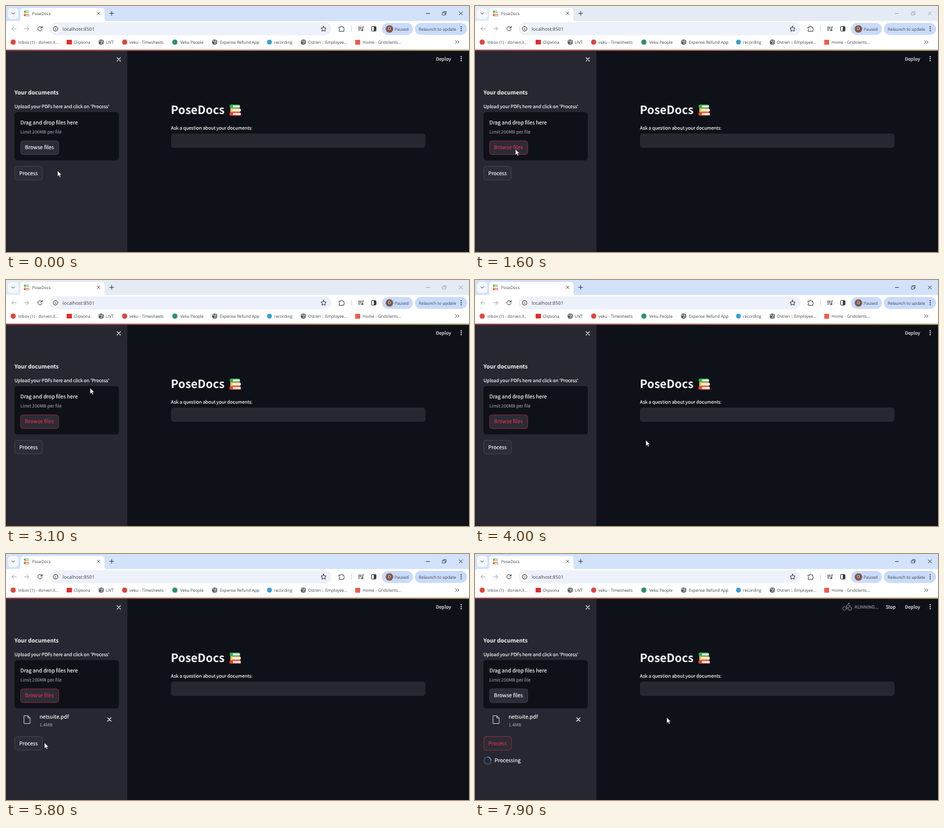
Animation of 710x378 px, one loop 8000 ms. Source, as an HTML page:

```html
<!DOCTYPE html>
<html lang="en">
<head>
<meta charset="utf-8">
<title>PoseDocs</title>
<style>
  html, body { margin: 0; width: 100%; height: 100%; overflow: hidden; background: #0e1117; }
  svg { display: block; width: 100%; height: 100%; }
  text { text-rendering: geometricPrecision; white-space: pre; }
  .chrome { font: 6.3px "Open Sans", "Noto Sans", sans-serif; fill: #3c4045; }
  .app { font: 7px "Noto Sans CJK SC", "Noto Sans CJK JP", "Noto Sans CJK", sans-serif; fill: #fafafa; }
  .app text { stroke: #fafafa; stroke-width: .14; }
  .app .body { font-size: 7.96px; }
  .app .bold { font-weight: 700; stroke: none; }
  .app .dim { fill: #94959b; stroke: #94959b; }
  .line { fill: none; stroke: #3c4045; stroke-width: 1; stroke-linecap: round; stroke-linejoin: round; }
  .light { stroke: #fafafa; }
  .button rect { fill: #2b2c36; stroke: #4b4c55; stroke-width: .7; }
  .button.hot rect { stroke: #b02f46; }
  .button.hot text { fill: #de304b; stroke: #de304b; }
  .sport { fill: none; stroke: #8b8d93; stroke-width: .9; stroke-linecap: round; stroke-linejoin: round; }
</style>
</head>
<body>
<svg viewBox="0 0 710 378" xmlns="http://www.w3.org/2000/svg">
  <defs>
    <linearGradient id="sunset"><stop stop-color="#a8404d"/><stop offset="1" stop-color="#a89a68"/></linearGradient>
    <g id="books">
      <path d="M2 .5H15L17 2V5L15 6H2Q0 3 2 .5Z" fill="#35b24a"/>
      <path d="M6 1.800H16.500V4.800H6Z" fill="#f4f5f0"/>
      <path d="M3 6H17V7.200H3ZM3 10.800H17V12H3Z" fill="#e8a33a"/>
      <path d="M3 7.200H18V10.800H3Z" fill="#f7f5ee"/>
      <path d="M2 6H5V12H2Z" fill="#e8c23a"/>
      <path d="M2 12H16L18 13V17.500H2Q-1 15 2 12Z" fill="#e0483a"/>
      <path d="M6 13.500H18V16.500H6Z" fill="#f4f1ea"/>
    </g>
    <g id="globe">
      <circle r="4" fill="#55595e"/>
      <path d="M-3 -1.4Q-.5 -2.6 .4 -.6T-1 2.6M1.2 -3Q.4 -.8 3.2 .2M1 2.8L2.4 1.5" fill="none" stroke="#fff" stroke-width=".9"/>
    </g>
    <path id="cross" d="M-2.4 -2.4L2.4 2.4M2.4 -2.4L-2.4 2.4"/>
    <path id="kebab" d="M0 -3V-3M0 0V0M0 3V3" stroke-width="1.8" stroke-linecap="round"/>
  </defs>

  <!-- Browser window -->
  <g class="chrome">
    <rect id="titleBar" width="710" height="30"/>
    <rect x="3" y="3" width="16" height="17" rx="5" fill="#f4f8ff"/>
    <path class="line" d="M9 10.5L11 12.5L13 10.5"/>
    <path d="M17 24Q22 24 22 19V8Q22 3 27 3H146Q151 3 151 8V19Q151 24 156 24Z" fill="#fff"/>
    <use href="#books" transform="translate(27 7) scale(.48)"/>
    <text x="40" y="13.8">PoseDocs</text>
    <use href="#cross" class="line" transform="translate(142 11.3) scale(.85)"/>
    <path class="line" d="M159 11.3H165M162 8.3V14.3"/>
    <g id="controls" class="line">
      <path d="M644.5 11.5H649.5"/>
      <path d="M669.5 10H673.5V14H669.5ZM671 10V8.5H675V12.5H673.5" stroke-width=".8"/>
      <use href="#cross" transform="translate(697.5 11.3)"/>
    </g>

    <path d="M0 68V27Q0 23 4 23H706Q710 23 710 27V68Z" fill="#fff"/>
    <g class="line">
      <path d="M15.5 35H9M12 32L9 35L12 38M28.5 35H35M32 32L35 35L32 38" stroke="#a9adb3"/>
      <path d="M55 33.2A3.3 3.3 0 1 0 55.3 36M55.5 31.5V33.8H53.2"/>
    </g>
    <rect x="67" y="25" width="432" height="20" rx="10" fill="#edf1fa"/>
    <circle cx="76" cy="35" r="6.5" fill="#fff"/>
    <g class="line">
      <circle cx="76" cy="35" r="3.6"/>
      <path d="M76 34.8V36.7M76 33.2V33.2"/>
      <path d="M487 31L488.2 33.6L491 34L489 36L489.5 38.8L487 37.4L484.5 38.8L485 36L483 34L485.8 33.6Z"/>
      <path d="M511 32.5H513.2A1.5 1.5 0 0 1 516.2 32.5H518V34.5A1.5 1.5 0 0 1 518 37V39H511V37A1.4 1.4 0 0 0 511 34.5Z"/>
      <path d="M540.5 32.5H545M540.5 34.7H545M540.5 37H543M547 37V32H548.5"/>
      <circle cx="546" cy="37.3" r="1"/>
      <rect x="560.5" y="31.5" width="7" height="7" rx=".8"/>
      <path d="M565.5 32V38" stroke-width="3" stroke-linecap="butt"/>
      <path d="M529.5 31V39" style="stroke:#c8d6ee"/>
    </g>
    <text x="87" y="37.7" style="font-size:7.25px">localhost:8501</text>
    <rect x="576.5" y="26" width="47.5" height="18.5" rx="9" fill="#c9dbfa"/>
    <circle cx="588" cy="35.2" r="5.8" fill="#80584c"/>
    <text x="588" y="37.3" text-anchor="middle" style="fill:#fff">D</text>
    <text x="596" y="37.5">Paused</text>
    <rect x="627" y="26" width="80" height="18.5" rx="9" fill="#c9dbfa"/>
    <text x="633" y="37.5">Relaunch to update</text>
    <use href="#kebab" x="698" y="35" stroke="#3c4045"/>

    <circle cx="11" cy="55.5" r="3.9" fill="#e0483c"/>
    <rect x="93" y="52" width="8" height="7" fill="#e32b2b"/>
    <use href="#globe" x="146" y="55.5"/>
    <circle cx="182" cy="55.5" r="3.9" fill="#d6483f"/>
    <circle cx="259" cy="55.5" r="3.9" fill="#2f8f6a"/>
    <use href="#globe" x="320" y="55.5"/>
    <circle cx="404" cy="55.5" r="3.7" fill="#3a9fd4"/>
    <use href="#globe" x="456" y="55.5"/>
    <rect x="535.5" y="52" width="7.5" height="7.5" fill="#ee5c4c"/>
    <g id="bookmarks"></g>
    <path class="line" d="M689.5 53.5L691.5 55.5L689.5 57.5M692.5 53.5L694.5 55.5L692.5 57.5"/>
  </g>

  <!-- Page -->
  <g class="app">
    <rect y="68" width="710" height="310" fill="#0e1117"/>
    <rect y="68" width="186.2" height="310" fill="#262730"/>
    <rect y="67" width="710" height="2" fill="url(#sunset)"/>

    <use href="#cross" class="line light" transform="translate(173 82) scale(1.1)"/>
    <text class="bold" x="13" y="135.8" style="font-size:8.5px">Your documents</text>
    <text x="13" y="156.8">Upload your PDFs here and click on 'Process'</text>
    <rect x="13" y="163" width="160" height="74.3" rx="4.5" fill="#0e1117"/>
    <text class="body" x="22" y="181.5">Drag and drop files here</text>
    <text class="dim" x="22" y="195.6" style="font-size:6.9px">Limit 200MB per file</text>
    <g id="browse" class="button">
      <rect x="22.4" y="207.2" width="58.4" height="21" rx="4"/>
      <text class="body" x="29" y="220.4">Browse files</text>
    </g>
    <g id="file">
      <path class="line" d="M28 248.5H33.5L37 252V260.5H28ZM33.5 248.5V252H37" style="stroke:#c3c4c9"/>
      <text class="body" x="51.5" y="252.5">netsuite.pdf</text>
      <text class="dim" x="51.5" y="264.5" style="font-size:6.8px">1.4MB</text>
      <use href="#cross" class="line light" transform="translate(158.5 254.3) scale(1.1)"/>
    </g>
    <g id="process" class="button">
      <rect x="13.4" y="246.3" width="42.4" height="21" rx="4"/>
      <text class="body" x="20.2" y="259.5">Process</text>
    </g>
    <g id="spinner">
      <g fill="none" stroke-width="1.5" transform="translate(19.3 317.5)">
        <circle r="5.4" stroke="#51525a"/>
        <path id="arc" d="M-3.82 -3.82A5.4 5.4 0 0 1 3.82 -3.82" stroke="#3d9df3"/>
      </g>
      <text class="body" x="30" y="320.4">Processing</text>
    </g>

    <text class="bold" x="252.8" y="166.2" style="font-size:17.5px">PoseDocs</text>
    <use href="#books" x="342" y="151"/>
    <text x="253" y="189.8">Ask a question about your documents:</text>
    <rect x="253" y="196" width="390.3" height="22" rx="4.5" fill="#262730"/>

    <g id="running">
      <g id="sports" transform="translate(571 81)">
        <g class="sport"><circle cx="1" cy="-4.8" r=".8"/><path d="M1 -3L0 .5H3L4 4.5H5.5M-3 -2L-.5 -3H1L3.5 -1.5"/><circle cx="-1" cy="2.5" r="3"/></g>
        <g class="sport"><circle cx="2" cy="-5" r=".9"/><path d="M1 -3L-1 1L2 2.5L1 5.5M-1 1L-2 3.5H-5M-3.5 -1L-2 -3H1L2.5 -1H4.5"/></g>
        <g class="sport"><circle cx="4" cy="-1.5" r="1"/><path d="M-5 1.5L-1 -1L-2 -3L2 -4M-1 -1L2 1.5M-6 4Q-4 2.5 -2 4T2 4T6 4"/></g>
        <g class="sport"><circle cx="-4.3" cy="2.8" r="2.8"/><circle cx="4" cy="2.8" r="2.8"/><circle cx="2" cy="-5" r=".8"/><path d="M0 3.5V1L-2 -1L1 -3.2L2.5 -1.5H4.5"/></g>
      </g>
      <text class="dim" x="582" y="83.5" style="font-size:6.9px">RUNNING...</text>
      <text x="630" y="83.7">Stop</text>
    </g>
    <text x="659.3" y="83.5" style="font-size:7.1px">Deploy</text>
    <use href="#kebab" x="698" y="81" stroke="#fafafa"/>
  </g>

  <path id="cursor" d="M0 0V9L2.1 7.1L3.5 10.2L5 9.6L3.6 6.6H6.3Z" fill="#fff" stroke="#15171c" stroke-width=".5"/>
</svg>
<script>
const $ = id => document.getElementById(id);
const LOOP = 8000, STEP = 100;

const bookmarks = [
  [19, 'Inbox (1) - dorven.li...'], [104, 'Clipvona'], [153, 'LIVT'],
  [189, 'veku - Timesheets'], [267, 'Veku People'], [328, 'Expense Refund App'],
  [411, 'recording'], [463, 'Ostren :: Employee...'], [547, 'Home - Gridolents...'],
];
$('bookmarks').innerHTML = bookmarks.map(([x, label]) => `<text x="${x}" y="57.8">${label}</text>`).join('');

// Pointer stops: time, x, y
const pointer = [
  [0, 79, 253], [700, 79, 253], [1100, 62, 220], [1800, 62, 220], [1900, 73, 225],
  [2000, 73, 225], [2300, 62, 240], [2800, 136, 159], [3000, 129, 166], [3200, 129, 166],
  [3900, 262, 246], [5500, 262, 246], [5800, 59, 290], [5900, 44, 291], [6100, 44, 291],
  [6500, 280, 278], [6600, 280, 278], [7500, 294, 251], [LOOP, 294, 251],
];

function pointerAt(t) {
  const i = pointer.findIndex(stop => stop[0] > t);
  const [t0, x0, y0] = pointer[i - 1], [t1, x1, y1] = pointer[i];
  const k = (t - t0) / (t1 - t0);
  return [x0 + (x1 - x0) * k, y0 + (y1 - y0) * k];
}

const show = (el, visible) => el.style.display = visible ? '' : 'none';

function draw(t) {
  const within = (from, to = LOOP) => t >= from && t < to;
  const unfocused = within(1400, 3900), uploaded = within(4100);

  $('titleBar').style.fill = unfocused ? '#e5ebf5' : '#d3e2fb';
  $('controls').style.stroke = unfocused ? '#a3a8af' : '#3c4045';
  $('browse').classList.toggle('hot', within(1000, 6200));
  $('process').classList.toggle('hot', within(5900));
  $('process').setAttribute('transform', `translate(0 ${uploaded ? 34.2 : 0})`);
  show($('file'), uploaded);

  show($('running'), within(4200, 4600) || within(6200));
  [...$('sports').children].forEach((icon, i, all) => show(icon, i === Math.floor(t / 200) % all.length));
  show($('spinner'), within(6700));
  $('arc').setAttribute('transform', `rotate(${45 + (t - 7900) / 750 * 360})`);
  $('cursor').setAttribute('transform', `translate(${pointerAt(t)})`);
}

const start = performance.now();
function tick() {
  const t = (performance.now() - start) % LOOP;
  draw(Math.floor(t / STEP) * STEP);
  requestAnimationFrame(tick);
}
tick();
</script>
</body>
</html>
```
